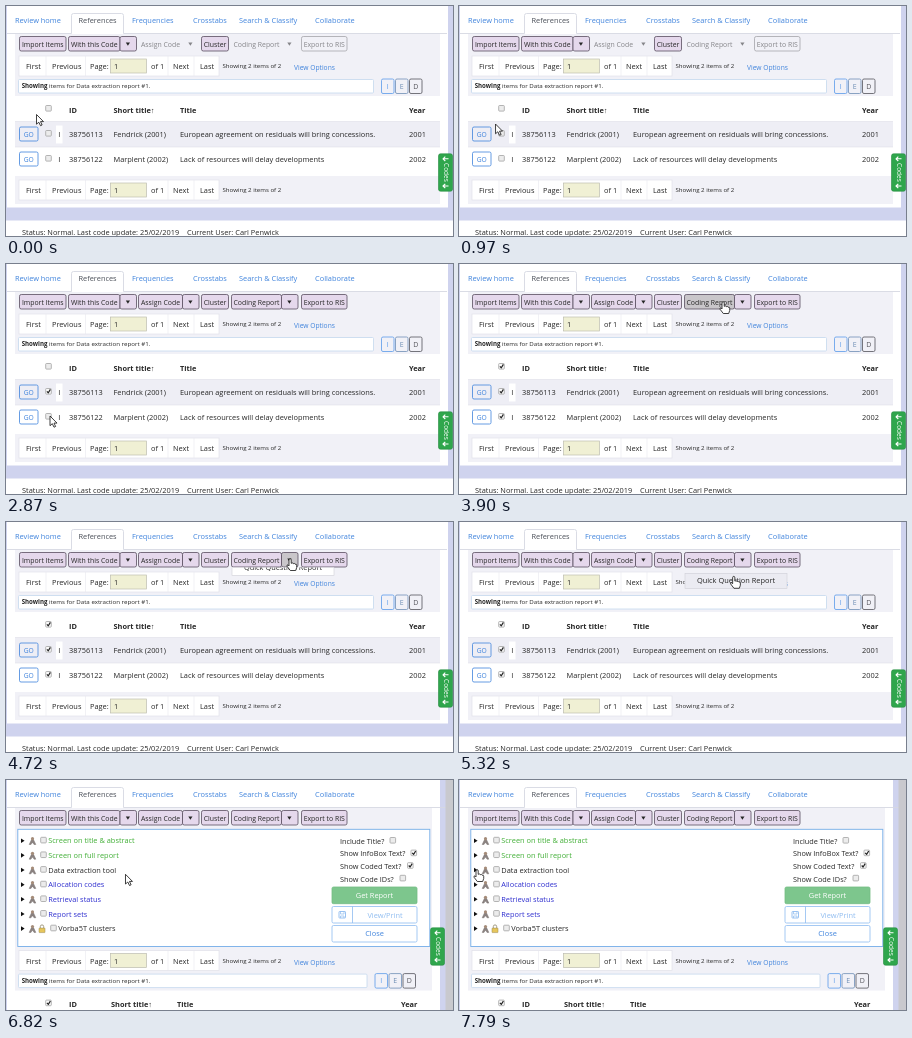
Animation, 447 px wide and 230 px high, one loop 8 s. Source, as an HTML page:

```html
<!DOCTYPE html>
<html>
<head>
<meta charset="utf-8">
<style>
html, body { margin: 0; height: 100%; overflow: hidden; }
svg { display: block; width: 447px; height: 230px; font-family: "Open Sans", sans-serif; white-space: pre; }
</style>
</head>
<body>
<svg viewBox="0 0 447 230"><g id="scene"></g><g id="cursor"></g></svg>
<script>
const LOOP = 8000;
const BLUE = '#3f83dc', INK = '#262626', PALE = '#f1f1f7', LAVENDER = '#cfd3ee';
const scene = document.getElementById('scene'), cursor = document.getElementById('cursor');

const rect = (x, y, w, h, fill, stroke = 'none', r = 0, sw = .8) =>
  `<rect x="${x}" y="${y}" width="${w}" height="${h}" rx="${r}" fill="${fill}" stroke="${stroke}" stroke-width="${sw}"/>`;
const text = (x, y, s, fill = INK, size = 7.4, extra = '') =>
  `<text x="${x}" y="${y}" fill="${fill}" font-size="${size}" ${extra}>${s}</text>`;
const path = (d, fill, stroke = 'none', sw = 1) =>
  `<path d="${d}" fill="${fill}" stroke="${stroke}" stroke-width="${sw}" stroke-linejoin="round"/>`;
const mid = 'text-anchor="middle"', bold = 'font-weight="700"';
const move = (x, y, s) => `<g transform="translate(${x} ${y})">${s}</g>`;

const check = (x, y, on) => rect(x, y, 5.6, 5.6, on ? '#fafafa' : '#ececec', '#a2a2a2', .8, .8) +
  (on ? path(`M${x + 1.2} ${y + 2.8}l1.4 1.5l2.1-3.4`, 'none', '#222', 1.2) : '');
const boxed = (x, y, w, h, label, color, size = 7.4, edge = color) =>
  rect(x, y, w, h, 'none', edge, 1.5) + text(x + w / 2, y + h / 2 + 2.6, label, color, size, mid);

function tabs() {
  const names = [[9, 'Review home'], [126, 'Frequencies'], [187, 'Crosstabs'], [233, 'Search &amp; Classify'], [309, 'Collaborate']];
  return path('M1 27.5H65.5V9.5q0-2 2-2H115.5q2 0 2 2V27.5H441', 'none', '#d6d9e2', .9) +
    names.map(([x, s]) => text(x, 17, s, BLUE)).join('') + text(72.5, 17, 'References', '#4a4f58');
}

function toolButton(x, w, label, on, caret, hover) {
  const face = '#e5d8ec', grey = '#c9c6ca', edge = on ? '#5a4f60' : 'none', ink = on ? INK : '#858589';
  const fill = h => on ? (h ? grey : face) : 'none';
  let s = rect(x, 30.5, w, 14.5, fill(hover === 'main'), !on && !caret ? '#a5a5aa' : edge, 1.8) +
    text(x + w / 2, 40.5, label, ink, 6.9, mid);
  if (caret) s += rect(x + w, 30.5, 16.5, 14.5, fill(hover === 'caret'), edge, 1.8) +
    path(`M${x + w + 5.8} 36.5h4.200l-2.100 3.300z`, ink);
  return s;
}

const toolbar = (on, hover) =>
  toolButton(13.5, 46.5, 'Import Items', true) +
  toolButton(62.5, 51.5, 'With this Code', true, true) +
  toolButton(132.5, 44, 'Assign Code', on, true) +
  toolButton(195.5, 27, 'Cluster', true) +
  toolButton(225.5, 50, 'Coding Report', on, true, hover) +
  toolButton(295.5, 45.5, 'Export to RIS', on);

function pager(y) {
  const words = [[20, 'First'], [46, 'Previous'], [84, 'Page:'], [108, '1'], [145, 'of 1'], [167, 'Next'], [194, 'Last']];
  return move(0, y, rect(13, 0, 200, 20, '#fff', '#dedee6', 0, .6) +
    path('M40 0v20M79.5 0v20M162 0v20M188 0v20', 'none', '#e8e8ee', .6) +
    rect(104.5, 3, 36, 14, '#f0f0d4', '#bdbdaf', 0, .7) +
    words.map(([x, s]) => text(x, 13.2, s)).join('') +
    text(216.5, 12, 'Showing 2 items of 2', INK, 6.1));
}

// The report list: narrower once a scrollbar takes room.
function list(narrow, tick1, tick2) {
  const shift = narrow ? -6.5 : 0, col = narrow ? [63, 105, 171, 395] : [63, 107.5, 174, 403], right = narrow ? 426 : 434;
  const cells = (row, y, extra) => row.map((s, i) => text(col[i], y, s, INK, 7.4, extra)).join('');
  const item = (y, row, on) => boxed(13.5, y + 5.5, 18.5, 14, 'GO', BLUE, 6.7) + check(39.7, y + 9, on) +
    rect(50, y + 4, 6.5, 18, '#fff') + text(52.2, y + 15.5, 'I') + cells(row, y + 15.4);
  return rect(9, 46, right - 9, 152, PALE) + pager(50) + text(288, 64, 'View Options', BLUE, 6.7) +
    rect(12.5, 73.5, 355 + shift, 13.5, '#fff', '#c5d8ee', 1) +
    text(15.7, 82.4, `<tspan ${bold}>Showing</tspan> items for Data extraction report #1.`, INK, 6.15) +
    [['I', '#5b9bea'], ['E', '#6f8fb5'], ['D', '#55555c']].map(([s, c], i) => boxed(375.5 + shift + i * 14, 73, 12.5, 14.5, s, c, 7)).join('') +
    rect(9, 90, right - 9, 80, '#fff') + rect(9, 115.5, right - 9, 25.5, '#eeeef5') +
    path(`M9 115.5H${right}M9 141H${right}`, 'none', '#dfdfe8', .6) +
    check(39.7, 99.5, tick1 && tick2) +
    cells(['ID', 'Short title<tspan font-weight="400">↑</tspan>', 'Title', 'Year'], 106.8, bold) +
    item(115.5, ['38756113', 'Fendrick (2001)', 'European agreement on residuals will bring concessions.', '2001'], tick1) +
    item(140.5, ['38756122', 'Marplent (2002)', 'Lack of resources will delay developments', '2002'], tick2) +
    pager(174);
}

function codesTab(x) {
  const arrow = y => path(`M${x + 4.5} ${y}h5.5M${x + 6.8} ${y - 2.2}l-2.300 2.200l2.300 2.200`, 'none', '#fff', 1.1);
  return rect(x, 147.8, 14, 37.4, '#2fa64c', '#258a3e', 2, .6) + arrow(152.8) + arrow(180) +
    `<text transform="translate(${x + 5} 166.4) rotate(90)" fill="#fff" font-size="6.5" text-anchor="middle">Codes</text>`;
}

function treeRow(i, label, color, hover, locked) {
  const y = 60.7 + i * 14.65, dx = locked ? 10 : 0;
  return (hover ? rect(33, y - 6, 77, 12, '#e7f4f9', '#d5dde2', 1, .6) : '') +
    path(`M15 ${y - 2.3}l3.6 2.3l-3.6 2.3z`, '#111') +
    path(`M25.5 ${y - 1}h2l2.300 4.800h-1.800l-1-1.800h-1l-1 1.800h-1.800z`, '#8b8280', '#77706f', .5) +
    `<circle cx="26.5" cy="${y - 2}" r="1.6" fill="#a58c79"/>` +
    (locked ? rect(33, y - .5, 6, 4.5, '#e6c65c', '#99844a', .5, .5) + path(`M34.3 ${y - .5}v-1.5a1.7 1.7 0 0 1 3.4 0v1.5`, 'none', '#9a9276', .9) : '') +
    check(34.7 + dx, y - 3.4, false) + text(42.3 + dx, y + 2.6, label, color);
}

function panel(hover) {
  const green = '#3fae34', blue = '#2f2fcf', soft = '#8fbcf0';
  const rows = [['Screen on title &amp; abstract', green], ['Screen on full report', green], ['Data extraction tool', INK],
    ['Allocation codes', blue], ['Retrieval status', blue], ['Report sets', blue], ['Vorba5T clusters', INK]];
  const options = [['Include Title?', 384], ['Show InfoBox Text?', 405], ['Show Coded Text?', 401.5], ['Show Code IDs?', 394]];
  return rect(11.8, 49.3, 412, 117.2, '#fff', '#76aee8', 0, .9) +
    rows.map(([s, c], i) => treeRow(i, s, c, hover && i === 2, i === 6)).join('') +
    options.map(([s, x], i) => text(334, 63.7 + i * 12.6, s, INK, 7.3) + check(x, 57.5 + i * 12.6, i === 1 || i === 2)).join('') +
    rect(326, 107, 85, 16.7, '#7dc68d', '#74bd85', 1.5) + text(368.5, 118, 'Get Report', '#fff', 7.4, mid) +
    rect(326, 126.5, 85, 16.5, '#fff', soft, 1.5) + path('M346.5 126.5v16.5', 'none', soft, .8) +
    rect(333, 131.5, 6.5, 6.5, 'none', soft, .6, .9) + path('M334.5 131.5v2.5h3.5v-2.5M334.5 138v-2h3.5v2', 'none', soft, .7) +
    text(379, 137.5, 'View/Print', soft, 7.4, mid) + boxed(326, 145.5, 85, 16.5, 'Close', BLUE, 7.4, soft);
}

// Drop-down slides out from under the button row.
function menu(open, hover) {
  return `<clipPath id="below"><rect x="220" y="45.5" width="120" height="30"/></clipPath><g clip-path="url(#below)">` +
    move(0, (open - 1) * 21, rect(226, 51.3, 102, 15.2, hover ? '#ebebf2' : '#fff', '#cfcfd8', 0, .6) +
      text(277, 61.4, 'Quick Question Report', INK, 7.4, mid)) + '</g>';
}

function page(s) {
  const right = s.report ? 434 : 442, inner = s.report ? 426 : 434;
  return rect(0, 0, 447, 230, LAVENDER) + rect(1, 0, right - 1, 201.5, '#fff') + tabs() +
    rect(9, 28, inner - 9, 24, PALE) +
    (s.report
      ? rect(1, 201, 433, 29, '#fff') + rect(9, 46, 417, 126, PALE) + move(0, 120.6, list(true, true, true)) +
        panel(s.treeHover) + rect(439.5, 0, 7.5, 230, '#c9c9ce')
      : list(false, s.tick1, s.tick2) + rect(0, 214.5, 447, 15.5, '#fff') +
        text(16, 228.5, 'Status:  Normal.') + text(71, 228.5, 'Last code update: 25/02/2019') + text(181, 228.5, 'Current User: Carl Penwick')) +
    codesTab(s.report ? 424.5 : 432.5) + toolbar(s.tick1, s.hover) +
    (s.open > 0 ? menu(s.open, s.menuHover) : '');
}

const ARROW = path('M0 0V9.7L2.3 7.7L4 11.2L5.6 10.5L4 7.1H7Z', '#fff', '#111', .8);
const HAND = path('M-1 1q0-1.4 1.1-1.4T1.2 1V4.3q1.6-.8 2 .3q1.5-.6 1.9 .6q1.5-.4 1.6 1V8.5L5.7 11.5H.3L-3 7.2q-.3-1.5 1-1.3l1 1Z', '#fff', '#111', .8);

// Pointer stops: time, x, y
const way = [[730, 30.5, 108.5], [1210, 42.5, 127.5], [2000, 42.5, 127.5], [2410, 44, 152], [3060, 44, 152], [3660, 206, 58],
  [3900, 264, 38], [4060, 267, 38], [4260, 284, 37], [5000, 284, 37], [5380, 274, 56], [6100, 274, 56], [6700, 134, 95],
  [7280, 5, 89], [7540, 24, 90], [7670, 24, 90], [7790, 18, 90]];
const ramp = (t, a, b) => Math.min(1, Math.max(0, (t - a) / (b - a)));
const smooth = u => u * u * (3 - 2 * u);

function pointer(t) {
  const i = way.findIndex(p => p[0] > t);
  if (i < 1) return (i ? way[way.length - 1] : way[0]).slice(1);
  const [a, ax, ay] = way[i - 1], [b, bx, by] = way[i], u = smooth(ramp(t, a, b));
  return [ax + (bx - ax) * u, ay + (by - ay) * u];
}

let shown = '';
function draw(now) {
  const t = now % LOOP, [x, y] = pointer(t);
  const overTools = t > 3660 && y < 46, overMenu = t > 5000 && t < 6150 && y > 48;
  const overTree = t > 6600 && x < 110 && x > 14;
  const state = {
    tick1: t >= 1800, tick2: t >= 2930, report: t >= 5910,
    hover: overTools && x > 225 ? (x < 276 ? 'main' : 'caret') : '',
    open: (.38 + .62 * smooth(ramp(t, 4720, 4920))) * (t >= 4720) * (1 - ramp(t, 6040, 6150)),
    menuHover: overMenu, treeHover: overTree && x > 20
  };
  const key = JSON.stringify(state);
  if (key !== shown) scene.innerHTML = page(state);
  shown = key;
  cursor.innerHTML = overTools && x > 195 || overMenu || overTree ? HAND : ARROW;
  cursor.setAttribute('transform', `translate(${x} ${y})`);
  requestAnimationFrame(() => draw(performance.now()));
}
draw(0);
</script>
</body>
</html>
```
